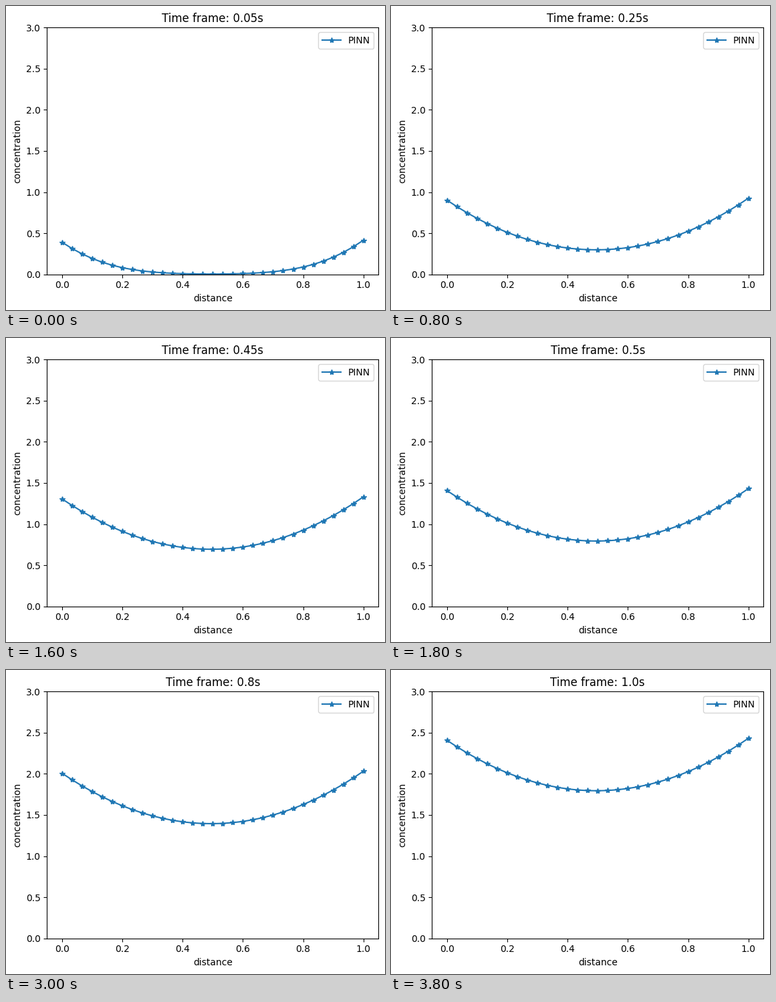
Animation, 567 px wide and 455 px high, one loop 4 s. Source, as a matplotlib script:

```python
import numpy as np
import matplotlib.pyplot as plt
from matplotlib.animation import FuncAnimation

plt.rcParams["font.family"] = "DejaVu Sans"

W, H, DPI = 567, 455, 100
FRAMES, INTERVAL = 20, 200
STEP = 0.05
DIFFUSIVITY, FLUX = 0.4, 1.0
SHIFT, LAG = 0.005, 0.001  # half a grid cell, small time offset

x = np.linspace(0, 1, 31)


def concentration(x, t):
    """Diffusion on [0, 1] from zero, with constant inflow at both ends."""
    x, t = x + SHIFT, t + LAG
    slope = FLUX / DIFFUSIVITY
    k = np.arange(1, 30)[:, None]
    decay = np.exp(-DIFFUSIVITY * (2 * np.pi * k) ** 2 * t)
    transient = (decay * np.cos(2 * np.pi * k * x) / (np.pi * k) ** 2).sum(axis=0)
    return 2 * FLUX * t + slope * (x**2 - x + 1 / 6 - transient)


fig = plt.figure(figsize=(W / DPI, H / DPI), dpi=DPI)
ax = fig.add_axes([61.28 / W, 53.28 / H, 496 / W, 369.6 / H])
line, = ax.plot(x, concentration(x, STEP), "-*", color="#1f77b4", label="PINN")
ax.set_xlim(-0.05, 1.05)
ax.set_ylim(0, 3)
ax.set_xlabel("distance")
ax.set_ylabel("concentration")
ax.legend(loc="upper right")
title = ax.set_title("")


def update(i):
    t = round((i + 1) * STEP, 2)
    line.set_ydata(concentration(x, t))
    title.set_text(f"Time frame: {t}s")
    return line, title


anim = FuncAnimation(fig, update, frames=FRAMES, interval=INTERVAL,
                     repeat=True, repeat_delay=0, blit=False)
plt.show()
```
